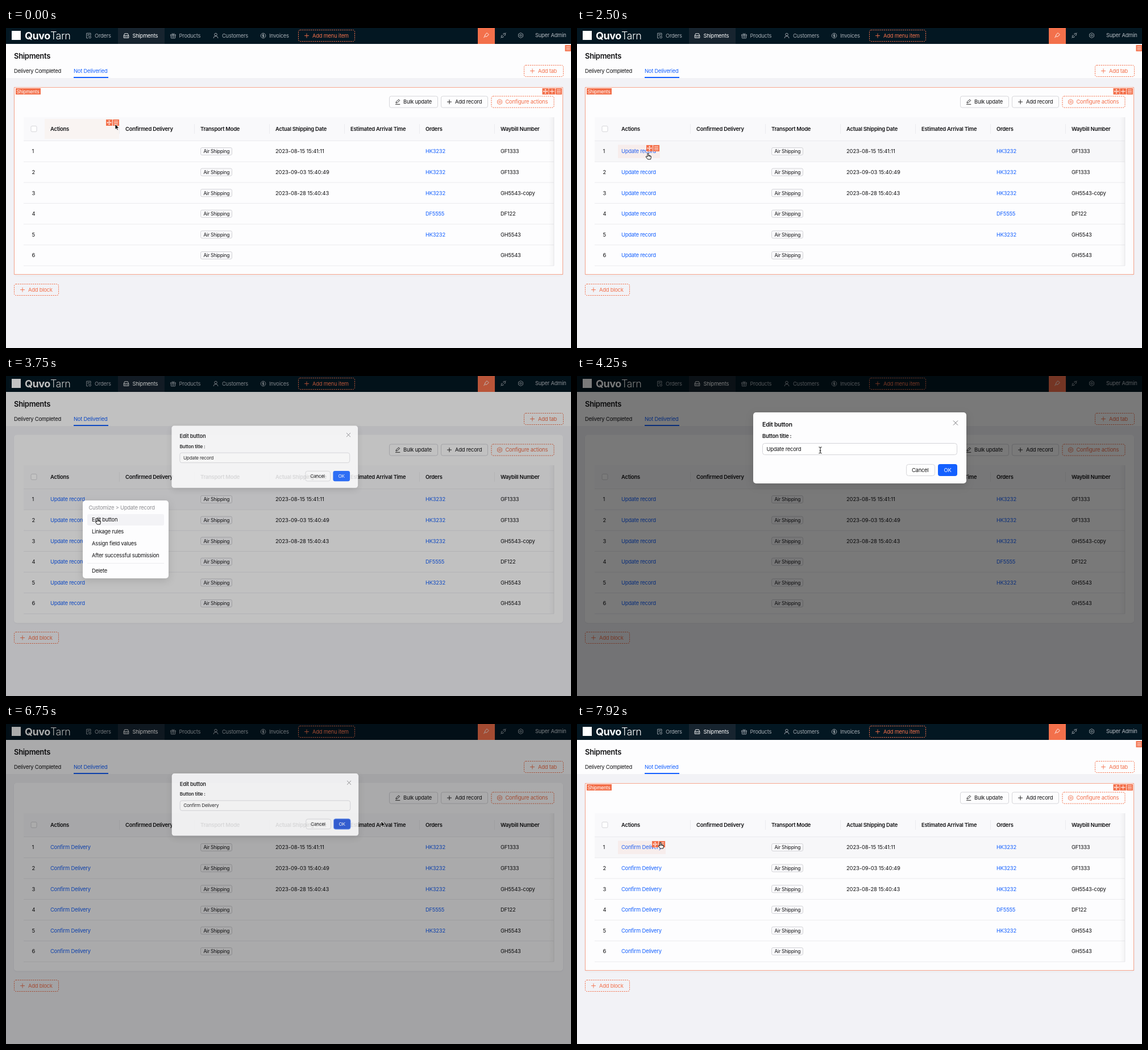
These frames come from a looping animation (994 by 563 pixels, 8 s). An HTML page:

```html
<!DOCTYPE html>
<html lang="en">
<head>
<meta charset="utf-8">
<title>Shipments</title>
<style>
html, body { margin: 0; width: 100%; height: 100%; overflow: hidden; background: #f2f2f6; }
svg { display: block; width: 100vw; height: 100vh; }
text { font: 9.4px Inter, Roboto, sans-serif; letter-spacing: -.025em; fill: #121214; white-space: pre; }
.bold { font-weight: 600; }
.title { font-size: 13px; font-weight: 600; }
.heading { font-size: 10.6px; font-weight: 600; }
.small { font-size: 8.4px; }
.date { letter-spacing: -.01em; }
.brand { font-size: 18px; font-weight: 700; }
.thin { font-weight: 300; }
.panel { filter: drop-shadow(0 4px 7px rgba(0, 0, 0, .13)); }
</style>
</head>
<body>
<svg id="stage" viewBox="0 0 994 563" preserveAspectRatio="none"></svg>
<script>
const BLUE = '#1460ff', ORANGE = '#f3704b', WHITE = '#fdfdfe', GREY = '#8c8c90', NAV = '#a6adb4';

const rect = (x, y, w, h, fill, extra = '') =>
  `<rect x="${x}" y="${y}" width="${w}" height="${h}" fill="${fill}" ${extra}/>`;
const text = (x, middle, content, fill = '#121214', cls = '', extra = '') =>
  `<text x="${x}" y="${middle + 3.4}" class="${cls}" style="fill:${fill}" ${extra}>${content}</text>`;
const icon = (x, y, d, color, width = .9) =>
  `<path transform="translate(${x} ${y})" d="${d}" fill="none" stroke="${color}" stroke-width="${width}"/>`;
const line = (x1, y1, x2, y2, color = '#ebebee') =>
  `<path d="M${x1} ${y1}L${x2} ${y2}" stroke="${color}"/>`;
const group = (id, content) => `<g id="${id}">${content}</g>`;

const ICONS = {
  plus: 'M-4 0H4M0-4V4',
  pen: 'M-4 4.3H4.3M-3 2L-2.5-.3 2-4.2 3.7-2.5-.7 1.5Z',
  gear: 'M0-4.5L3.9-2.3V2.3L0 4.5-3.9 2.3V-2.3ZM1.6 0A1.6 1.6 0 1 1-1.6 0 1.6 1.6 0 1 1 1.6 0',
  order: 'M-1 4.3H-3.8V-4.3H3.5V0M-2-2H2M-2 0H0M4 2.6A1.8 1.8 0 1 1 .4 2.6 1.8 1.8 0 1 1 4 2.6',
  car: 'M-4.3 3.8V0L-2.8-3.6H2.8L4.3 0V3.8ZM-4.3 0H4.3M-2.6 2H-1M1 2H2.6',
  gift: 'M-4.3-2H4.3V.3H-4.3ZM-3.6 .3V4.3H3.6V.3M0-2V4.3M0-2L-2-4.4M0-2L2-4.4',
  user: 'M2.3-2A2.3 2.3 0 1 1-2.3-2 2.3 2.3 0 1 1 2.3-2M-4 4.5Q-3.6 .7 0 .7T4 4.5',
  money: 'M4.3 0A4.3 4.3 0 1 1-4.3 0 4.3 4.3 0 1 1 4.3 0M1.6-1.4Q0-2.6-1.4-1.4T0 0 1.4 1.4-1.6 1.4M0-3V3',
  marker: 'M-4.3 4.2L-2.6 1-1.2 2.4M-2.6 1L-1.6-1.8 1.2-4.4 4.2-1.4 1.6 1.4-1.2 2.4',
  plug: 'M-4.6 4.6L-2.6 2.6M4.6-4.6L2.6-2.6M-2.6-.4L.4 2.6-.8 3.6H-2.6L-3.6 2.6V.8ZM2.6 .4L-.4-2.6 .8-3.6H2.6L3.6-2.6V-.8Z',
  close: 'M-4-4L4 4M4-4L-4 4',
  drag: 'M-4 0H4M0-4V4M-1.2-3H1.2M-1.2 3H1.2M-3-1.2V1.2M3-1.2V1.2',
  bars: 'M-3.6-2.7H3.6M-3.6 0H3.6M-3.6 2.7H3.6',
  chevron: 'M-1.5-3L1.5 0-1.5 3'
};

const button = (x, y, w, name, label, color, dashed) =>
  rect(x + .5, y + .5, w - 1, 20, dashed ? 'none' : WHITE,
    `rx="3" stroke="${dashed ? color : '#d6d6da'}" ${dashed ? 'stroke-dasharray="2.2 1.5"' : ''}`) +
  icon(x + 15, y + 10.5, ICONS[name], color) + text(x + 25, y + 10.5, label, color);
const handle = (x, y, name) =>
  rect(x, y, 11, 11, ORANGE) + icon(x + 5.5, y + 5.5, ICONS[name], '#fff');
const handles = (right, y) => handle(right - 23, y, 'drag') + handle(right - 11, y, 'bars');
const highlight = (id, x, y, w, h) => group(id, rect(x, y, w, h, '#f3f3f6', 'rx="3"'));
const panel = (x, y, w, h) => rect(x, y, w, h, WHITE, 'rx="5" class="panel"');

const rowY = i => 217 + i * 36.6;

function navBar() {
  const items = [[145.5, 156, 'order', 'Orders'], [211.5, 222.5, 'car', 'Shipments'], [294, 304.5, 'gift', 'Products'],
    [369, 380, 'user', 'Customers'], [452.5, 463, 'money', 'Invoices']];
  return rect(0, 0, 994, 28, '#031722') + rect(197, 0, 82, 28, '#17242f') +
    rect(10, 5, 16, 16, '#fff') +
    text(33, 16.5, 'Quvo<tspan class="thin">Tarn</tspan>', '#fff', 'brand') +
    items.map(([ix, tx, name, label]) => {
      const color = label === 'Shipments' ? '#fff' : NAV;
      return icon(ix, 13.5, ICONS[name], color) + text(tx, 13.5, label, color);
    }).join('') +
    button(514, 3, 100, 'plus', 'Add menu item', ORANGE, true) +
    rect(830, 0, 30, 28, ORANGE) + icon(845, 13, ICONS.marker, '#fff') +
    icon(875, 13, ICONS.plug, NAV) + icon(905.5, 13, ICONS.gear, NAV) +
    text(931, 13, 'Super Admin', '#b4bac0');
}

function pageHead() {
  return rect(0, 28, 994, 60, WHITE) + text(14, 50.5, 'Shipments', '#121214', 'title') +
    text(14, 75.5, 'Delivery Completed') + text(119, 75.5, 'Not Deliveried', BLUE) +
    rect(119, 86, 61, 2, BLUE) +
    button(911, 65, 70, 'plus', 'Add tab', ORANGE, true) +
    button(14, 450, 79, 'plus', 'Add block', ORANGE, true);
}

function table() {
  const heads = ['Actions', 'Confirmed Delivery', 'Transport Mode', 'Actual Shipping Date',
    'Estimated Arrival Time', 'Orders', 'Waybill Number'];
  const rows = [['2023-08-15 15:41:11', 'HK3232', 'GF1333'], ['2023-09-03 15:40:49', 'HK3232', 'GF1333'],
    ['2023-08-28 15:40:43', 'HK3232', 'GH5543-copy'], ['', 'DF5555', 'DF122'], ['', 'HK3232', 'GH5543'], ['', '', 'GH5543']];
  return rect(31, 157, 933, 41, '#f9f9fb') +
    group('headHover', rect(68, 160, 131, 35, '#f9f4f2')) +
    group('rowHover', rect(31, 199, 933, 36, '#f7f7f9')) +
    rect(44, 172.5, 10, 10, '#fff', 'rx="2" stroke="#d6d6da"') +
    heads.map((label, i) => text(78 + i * 132, 177.5, label, '#121214', 'bold') +
      (i ? line(67.5 + i * 132, 169, 67.5 + i * 132, 186) : '')).join('') +
    line(31, 198.5, 964, 198.5) +
    rows.map(([date, order, waybill], i) => {
      const y = rowY(i);
      return text(45.5, y, i + 1) +
        rect(342.5, y - 6.5, 55, 13, '#fafafc', 'rx="2.5" stroke="#d3d3d7"') +
        text(347.5, y, 'Air Shipping', '#121214', 'small') +
        text(474, y, date, '#121214', 'date') + text(738, y, order, BLUE) + text(870, y, waybill) +
        line(31, y + 18.3, 964, y + 18.3);
    }).join('') +
    line(964, 157, 964, 418) + rect(955, 157, 9, 261, 'url(#edge)');
}

const actionColumn = (id, label) =>
  group(id, Array.from({ length: 6 }, (_, i) => text(78, rowY(i), label, BLUE)).join(''));
const actionHover = (id, right) =>
  group(id, rect(72, 205.5, right + 1 - 72, 23.5, '#f36f4a', 'opacity=".08"') + handles(right, 206));

function actionsMenu() {
  return panel(189, 173, 103, 165) + text(199, 187, 'Enable actions', GREY) +
    ['View', 'Edit', 'Delete', 'Duplicate'].map((label, i) => {
      const y = 208 + i * 21;
      return text(204, y, label) + rect(258, y - 5.2, 18, 10.4, '#b4b4b7', 'rx="5.2"') +
        `<circle cx="263.2" cy="${y}" r="4" fill="#fff"/>`;
    }).join('') +
    line(189, 284.5, 292, 284.5) + highlight('overCustomize', 192, 288, 97, 21) +
    text(199, 298, 'Customize') + icon(280, 298, ICONS.chevron, '#555') +
    line(189, 311.5, 292, 311.5) + text(199, 325, 'Column width');
}

function customizeMenu() {
  return panel(290, 287, 88, 69) + highlight('overPopup', 292.5, 290, 83, 21) +
    highlight('overUpdate', 292.5, 311.5, 83, 21) +
    text(300, 300.8, 'Popup') + text(300, 322, 'Update record') + text(300, 343, 'Custom request');
}

function buttonMenu() {
  return panel(135, 219, 151, 137) + highlight('overEdit', 143, 243, 135, 20) +
    text(145.5, 232, 'Customize &gt; Update record', GREY) +
    ['Edit button', 'Linkage rules', 'Assign field values', 'After successful submission']
      .map((label, i) => text(151, 253 + i * 21, label)).join('') +
    line(143, 329.5, 278, 329.5) + text(151, 343, 'Delete');
}

function modal() {
  return panel(310, 64, 375, 125) + text(326, 85.3, 'Edit button', '#121214', 'heading') +
    icon(666, 82.5, ICONS.close, '#77777b', 1) + text(326, 105.3, 'Button title :', '#121214', 'bold') +
    rect(326.5, 118.5, 342, 20, '#fff', 'rx="4" stroke="#d4d4d8"') +
    group('focus', rect(326.2, 118.2, 342.6, 20.6, 'none', 'rx="4" stroke="#4a86ff" stroke-width="1.3"') +
      rect(333.5, 123, .9, 11.5, '#111', 'id="caret"')) +
    text(333.5, 128.3, '', '#121214', '', 'id="field"') +
    rect(579.5, 155.5, 50, 20, '#fff', 'rx="4" stroke="#d6d6da"') + text(589, 165.7, 'Cancel') +
    rect(635, 155, 34, 21, BLUE, 'rx="4" id="ok"') + text(645.5, 165.7, 'OK', '#fff');
}

const cursors =
  group('arrow', '<path d="M0 0V9.6L2.2 7.6 3.7 11 5.3 10.3 3.8 7H6.8Z" fill="#000" stroke="#fff" stroke-width=".8"/>') +
  group('hand', '<path d="M-1 1a1 1 0 0 1 2 0V4.2L4.4 5Q5.6 5.4 5.4 6.9L4.6 11H-.6L-3.6 7Q-4 5.5-2.6 5.7L-1 6.8ZM1 4.2V6M2.7 4.7V6.3M4.2 5V6.5" fill="#fff" stroke="#000" stroke-width=".9"/>') +
  group('beam', '<path d="M-2.6-5Q0-5 0-3.6Q0-5 2.6-5M0-3.6V4.6M-2.6 6Q0 6 0 4.6Q0 6 2.6 6M-1.3 1.5H1.3" fill="none" stroke="#111" stroke-width="1"/>');

document.getElementById('stage').innerHTML =
  `<defs><linearGradient id="edge"><stop stop-color="#000" stop-opacity="0"/><stop offset="1" stop-color="#000" stop-opacity=".04"/></linearGradient></defs>` +
  rect(0, 0, 994, 563, '#f2f2f6') + pageHead() + navBar() +
  rect(14, 103.5, 966, 331, WHITE, 'rx="5" style="filter:drop-shadow(0 1px 1px rgba(0,0,0,.05))"') +
  button(674, 119.5, 86, 'pen', 'Bulk update', '#121214') +
  button(765, 119.5, 83, 'plus', 'Add record', '#121214') +
  button(853.5, 119.5, 111, 'gear', 'Configure actions', ORANGE, true) +
  table() + actionColumn('updateLabels', 'Update record') + actionColumn('confirmLabels', 'Confirm Delivery') +
  group('hints', rect(14.5, 104.5, 965, 329, 'none', 'stroke="#f5a48d"') +
    rect(17, 106, 44, 11, ORANGE) + text(18.5, 111.3, 'Shipments', '#fff', 'small') +
    handle(943.5, 106, 'drag') + handle(955.2, 106, 'plus') + handle(967, 106, 'bars') + handle(983.5, 30, 'bars')) +
  group('headHandles', handles(199, 161)) +
  actionHover('updateHover', 145) + actionHover('confirmHover', 155) +
  group('actionsMenu', actionsMenu()) + group('customizeMenu', customizeMenu()) +
  group('mask', rect(0, 0, 994, 563, '#000')) +
  group('buttonMenu', buttonMenu()) + group('modal', modal()) + group('cursor', cursors);

const parts = {};
document.querySelectorAll('[id]').forEach(el => parts[el.id] = el);

const LOOP = 8000, STEP = 1000 / 12;
const clamp = v => Math.max(0, Math.min(1, v));
const smooth = v => v * v * (3 - 2 * v);
const circOut = v => Math.sqrt(1 - (1 - v) ** 2);
const fade = (t, inStart, inEnd, outStart, outEnd) =>
  Math.min(clamp((t - inStart) / (inEnd - inStart)), clamp((outEnd - t) / (outEnd - outStart)));

// Spans during which each part is shown, as [from, to] pairs in ms.
const shown = {
  hints: [[0, 480], [2080, 3240], [7200, LOOP]],
  headHover: [[0, 480]], headHandles: [[0, 480]],
  rowHover: [[2300, 4000], [7560, LOOP]],
  updateLabels: [[1980, 6740]], confirmLabels: [[6740, LOOP]],
  updateHover: [[2330, 3240]], confirmHover: [[7600, LOOP]],
  overCustomize: [[880, 1325]], overPopup: [[1325, 1410]], overUpdate: [[1410, 2000]],
  overEdit: [[3400, 4100]], focus: [[4410, 6410]],
  hand: [[2330, 4080], [6330, 6740], [7600, LOOP]],
  beam: [[4080, 5900]],
  arrow: [[0, 2330], [5900, 6330], [6740, 7600]]
};

// Pointer stops: time, x, y.
const path = [[0, 192, 169], [420, 192, 169], [1000, 255, 298], [1250, 262, 299], [1500, 323, 321], [1750, 323, 321],
  [2500, 125, 220], [2600, 126, 220], [2830, 139, 210], [3170, 139, 210], [3500, 161, 250], [3750, 161, 250],
  [4250, 428, 130], [5750, 428, 130], [6200, 686, 186], [6500, 660, 171], [6750, 660, 171],
  [7500, 138, 238], [7750, 147, 210], [7910, 147, 208], [LOOP, 147, 208]];

function pointer(t) {
  const i = path.findIndex(stop => stop[0] > t);
  const [t0, x0, y0] = path[i - 1], [t1, x1, y1] = path[i];
  const k = smooth((t - t0) / (t1 - t0));
  return `translate(${x0 + (x1 - x0) * k} ${y0 + (y1 - y0) * k})`;
}

function slide(el, top, amount) {
  const k = circOut(amount);
  el.style.opacity = k;
  el.setAttribute('transform', `translate(0 ${top}) scale(1 ${.8 + .2 * k}) translate(0 ${-top})`);
}

function fieldText(t) {
  if (t < 4740) return 'Update record';
  if (t < 4990) return 'Update ';
  return t < 5490 ? '' : 'Confirm Delivery';
}

function draw(t) {
  for (const id in shown)
    parts[id].style.display = shown[id].some(([from, to]) => t >= from && t < to) ? '' : 'none';

  slide(parts.actionsMenu, 173, fade(t, 40, 270, 1790, 1960));
  slide(parts.customizeMenu, 287, fade(t, 980, 1180, 1790, 1960));
  slide(parts.buttonMenu, 219, fade(t, 2780, 3040, 3790, 3990));

  parts.mask.style.opacity = .52 * fade(t, 3668, 3846, 6674, 6880);
  const open = circOut(fade(t, 3668, 3846, 6674, 6816));
  parts.modal.style.opacity = open;
  parts.modal.setAttribute('transform', `translate(163 250) scale(${.2 + .8 * open}) translate(-163 -250)`);

  parts.field.textContent = fieldText(t);
  const width = parts.field.textContent ? parts.field.getComputedTextLength() : 0;
  parts.caret.setAttribute('x', 333.5 + width);
  const pressed = t >= 6410;
  parts.ok.setAttribute('fill', pressed ? '#1d4fd7' : BLUE);
  parts.ok.setAttribute('stroke', pressed ? '#7ea8ff' : 'none');

  parts.cursor.setAttribute('transform', pointer(t));
}

const start = performance.now();
function tick() {
  const elapsed = (performance.now() - start) % LOOP;
  draw(Math.floor((elapsed + 4) / STEP) * STEP % LOOP);
  requestAnimationFrame(tick);
}
tick();
</script>
</body>
</html>
```
